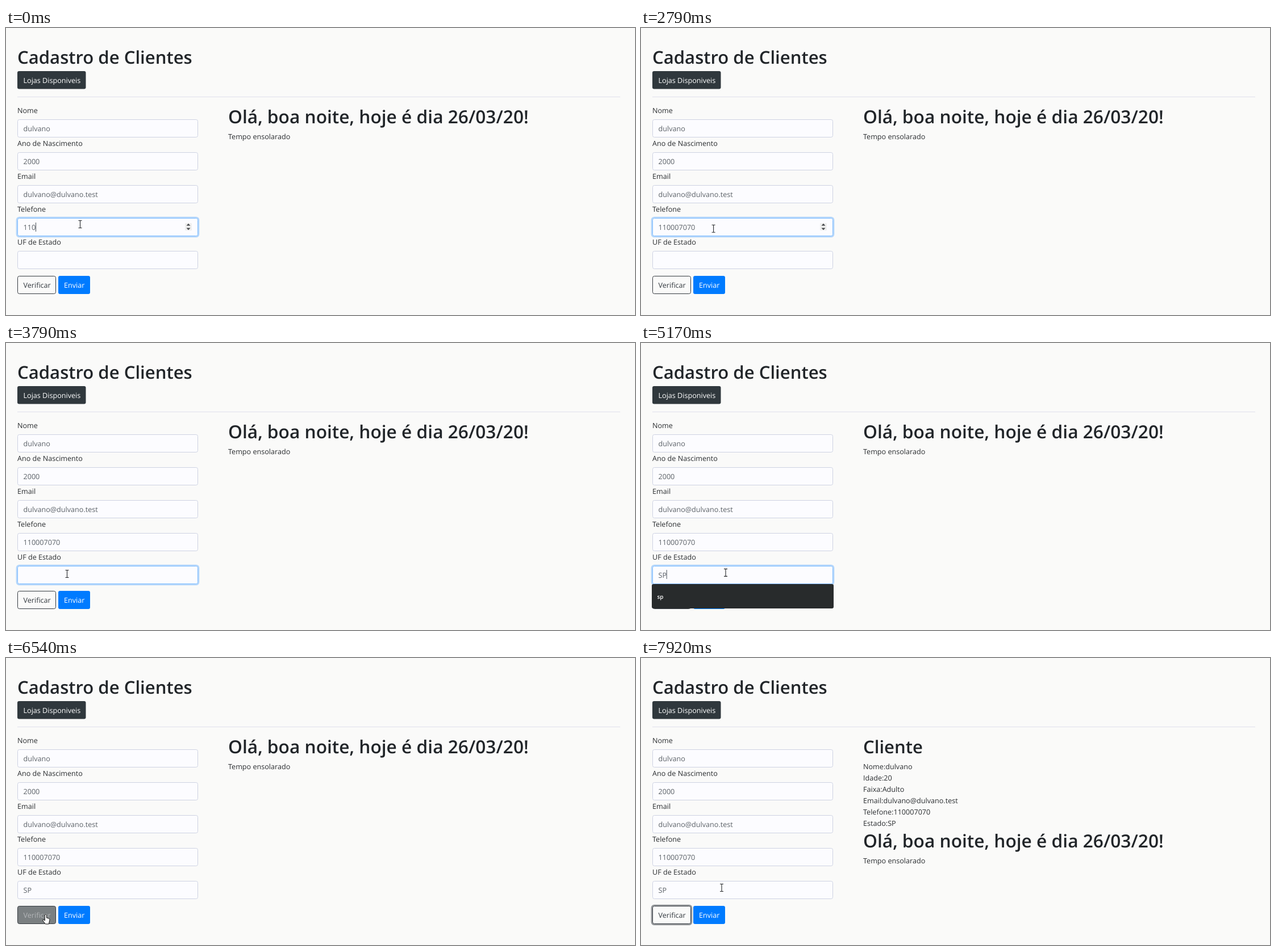
Recreate the animation shown at these times as an HTML page. Size 1107 by 506 pixels, loop 8000 ms.

```html
<!DOCTYPE html>
<html lang="pt-BR">
<head>
<meta charset="utf-8">
<title>Cadastro de Clientes</title>
<style>
  html, body { margin: 0; width: 100%; height: 100%; overflow: hidden; background: #fafaf9; }
  svg { display: block; width: 1107px; height: 506px; }
  text { font: 12.6px "Open Sans", "Noto Sans", sans-serif; fill: #2b2e31; text-rendering: geometricPrecision; white-space: pre; }
  .h { font-size: 31.1px; font-weight: 600; fill: #212529; }
  .wide { font-size: 31.7px; }
  .value { fill: #5c6268; }
  .light { fill: #fff; }
  .hint { font-size: 10px; font-weight: 600; fill: #fff; }
</style>
</head>
<body>
<svg id="stage" viewBox="0 0 1107 506"></svg>
<script>
const LOOP = 8000;
const NAME = "dulvano", EMAIL = "dulvano@dulvano.test", PHONE = "110007070";
const LABELS = ["Nome", "Ano de Nascimento", "Email", "Telefone", "UF de Estado"];
const PHONE_KEYS = [250, 340, 500, 1420, 1670, 2040];
const UF_KEYS = [4250, 4670];
const CLICK_UF = 3290, CLICK_AWAY = 5700, CLICK_CHECK = 6800, SHOW_RESULT = 6880;
const ENTER_CHECK = 6447, LEAVE_CHECK = 7735;

// Pointer stops: time, x, y
const STOPS = [
  [0, 130.5, 346], [2760, 130.5, 346], [3230, 107.5, 407], [5169, 107.5, 407],
  [5170, 148, 405], [5720, 436, 384], [5920, 438, 377], [5970, 438, 377],
  [6590, 67.5, 452.5], [7690, 67.5, 452.5], [7920, 142, 405], [LOOP, 142, 405]
];

const clamp = v => Math.max(0, Math.min(1, v));
const fade = (t, start) => clamp((t - start) / 150);
const within = (t, ...spans) => spans.some(([a, b]) => t >= a && t < b);
const typed = (t, keys) => keys.filter(k => t >= k).length;

const text = (x, y, s, cls = "") => `<text x="${x}" y="${y}" class="${cls}">${s}</text>`;
const box = (x, y, w, h, attrs, r = 3) =>
  `<rect x="${x}" y="${y}" width="${w}" height="${h}" rx="${r}" ${attrs}/>`;
const glow = (x, y, w, h, color, alpha) =>
  box(x - 1.5, y - 1.5, w + 3, h + 3, `fill="none" stroke="${color}" stroke-width="2.7" stroke-opacity="${alpha}"`, 4.5);
const caret = (x, y) => `<path d="M${x} ${y}v16" stroke="#495057"/>`;

function mix(a, b, k) {
  return `rgb(${a.map((v, i) => Math.round(v + (b[i] - v) * k))})`;
}

function pointerAt(t) {
  const i = STOPS.findIndex(s => s[0] > t);
  const [t0, x0, y0] = STOPS[i - 1], [t1, x1, y1] = STOPS[i];
  const k = 1 - (1 - (t - t0) / (t1 - t0)) ** 2;
  return [x0 + (x1 - x0) * k, y0 + (y1 - y0) * k];
}

function pointer(t) {
  const [x, y] = pointerAt(t);
  const inField = x > 20 && x < 338 && y > 161 && y < 425 && (y - 161) % 58 < 32;
  const onButton = y > 437 && y < 469 && x > 20 && x < 148;
  let shape = `<path d="M0 0V12L2.7 9.5 4.6 13.8 6.4 13 4.6 8.8H8Z" stroke="#fff" stroke-width=".5"/>`;
  if (inField) shape = `<path d="M-3-6.5H3M0-6.5V6.5M-3 6.5H3" fill="none" stroke="#26282b" stroke-width="1.1"/>`;
  if (onButton) shape = `<path d="M-1.5 1Q0-1 1.5 1V6L6 7.2Q7.5 7.8 7 10.5L5.5 17H-.5L-5 11Q-5.5 9-3.5 9.3L-1.5 11Z" fill="#fff" stroke="#111"/>`;
  return `<g transform="translate(${x.toFixed(1)} ${y.toFixed(1)})">${shape}</g>`;
}

function fields(t) {
  const phone = PHONE.slice(0, 3 + typed(t, PHONE_KEYS));
  const uf = "SP".slice(0, typed(t, UF_KEYS));
  const values = [NAME, "2000", EMAIL, phone, uf];
  const ufFocus = fade(t, CLICK_UF) - fade(t, CLICK_AWAY);
  const focus = [0, 0, 0, 1 - fade(t, CLICK_UF), ufFocus];
  let out = LABELS.map((label, i) => {
    const y = 161.5 + 58 * i;
    const edge = mix([206, 210, 226], [128, 189, 255], focus[i]);
    return text(20, 150 + 58 * i, label)
      + (focus[i] ? glow(20.5, y, 317, 31, "#007bff", focus[i] * 0.28) : "")
      + box(20.5, y, 317, 31, `fill="#fcfcff" stroke="${edge}"`)
      + text(30.5, 182 + 58 * i, values[i], "value");
  }).join("");
  if (t < CLICK_UF) {
    out += box(315, 344, 12, 13, `fill="#efefef"`, 1)
      + `<path d="M317.5 348.5L321 344.8 324.5 348.5ZM317.5 352.5L321 356.2 324.5 352.5Z" fill="#45484b"/>`;
  }
  if (within(t, [0, 1000], [1420, 2540], [3040, CLICK_UF])) out += caret(31 + 7.18 * phone.length, 343);
  if (within(t, [CLICK_UF, 3790], [4250, 5200], [5670, CLICK_AWAY])) out += caret(31 + 7.1 * uf.length, 400);
  return out;
}

function buttons(t) {
  const hover = fade(t, ENTER_CHECK) - fade(t, LEAVE_CHECK);
  const ring = fade(t, CLICK_CHECK);
  const ink = mix([52, 58, 64], [255, 255, 255], hover);
  return (ring ? glow(20.5, 437.5, 67, 31, "#343a40", ring * 0.5) : "")
    + box(20.5, 437.5, 67, 31, `fill="#30383d" fill-opacity="${hover}" stroke="#343a40"`)
    + `<text x="30.5" y="458" style="fill:${ink}">Verificar</text>`
    + box(92, 437, 56, 32, `fill="#007bff"`)
    + text(102, 458, "Enviar", "light");
}

function panel(t) {
  const shown = t >= SHOW_RESULT;
  const lines = ["Nome:" + NAME, "Idade:20", "Faixa:Adulto", "Email:" + EMAIL, "Telefone:" + PHONE, "Estado:SP"];
  const drop = shown ? 165.5 : 0;
  return (shown ? text(391, 168, "Cliente", "h") + lines.map((s, i) => text(391, 196 + 19.9 * i, s)).join("") : "")
    + text(391, 168 + drop, "Olá, boa noite, hoje é dia 26/03/20!", "h wide")
    + text(391, 196 + drop, "Tempo ensolarado");
}

const header = text(20, 63, "Cadastro de Clientes", "h")
  + box(20, 76, 120.5, 31.5, `fill="#30383d"`)
  + text(30.5, 97, "Lojas Disponiveis", "light")
  + `<path d="M20 121.5H1081" stroke="#e0e0ec"/>`;

const suggestion = box(19, 425, 320, 43, `fill="#282b2c"`) + text(28.5, 451, "sp", "hint");

const stage = document.getElementById("stage");

function draw(now) {
  const t = now % LOOP;
  stage.innerHTML = header + panel(t) + fields(t) + buttons(t)
    + (within(t, [UF_KEYS[0], CLICK_AWAY]) ? suggestion : "") + pointer(t);
  requestAnimationFrame(draw);
}
draw(0);
</script>
</body>
</html>
```
